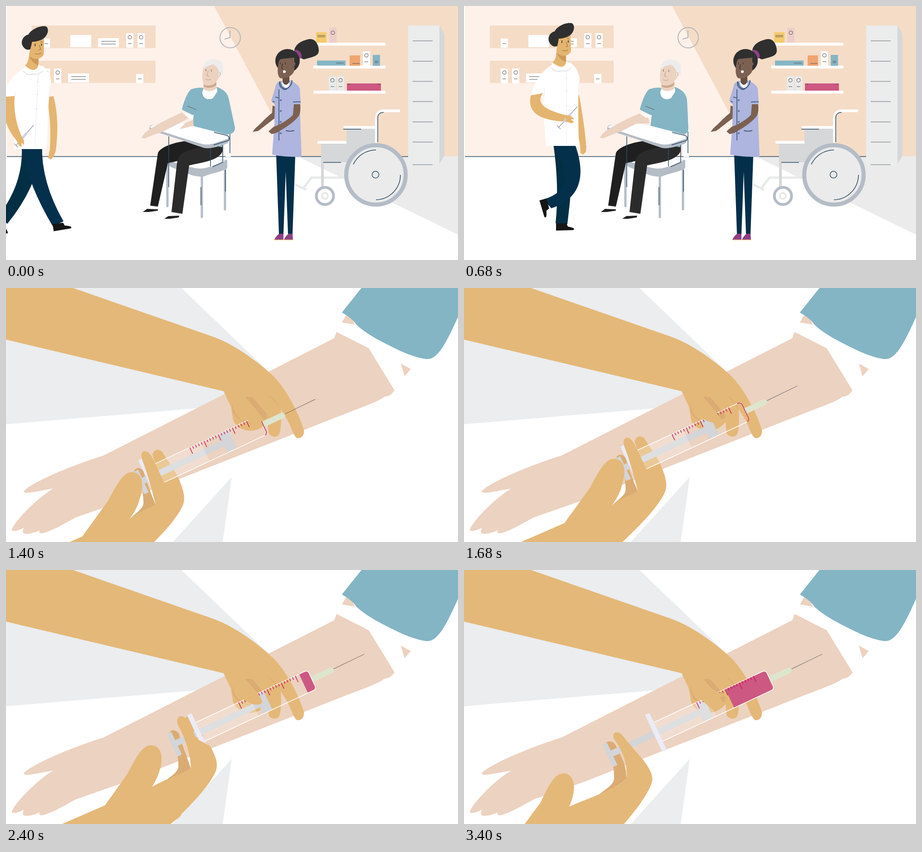
Write an HTML page that moves like this. It is 997 by 561 pixels and loops after 3.44 s.

```html
<!DOCTYPE html>
<html lang="en">
<head>
<meta charset="utf-8">
<title>Blood test</title>
<style>
html, body { margin: 0; width: 100%; height: 100%; overflow: hidden; background: #fff; }
svg { display: block; width: 100%; height: 100%; }
.line { fill: none; stroke: #2c4c63; stroke-width: 1.5; }
.thin { fill: none; stroke: #555; stroke-width: 1; }
.steel { fill: none; stroke: #b4bcc6; stroke-width: 5; stroke-linecap: round; }
</style>
</head>
<body>
<svg viewBox="0 0 997 561" preserveAspectRatio="none">
<g id="room">
  <path d="M2 0H997V332H2Z" fill="#fef1ea"/>
  <path d="M459 0H997V332H636Z" fill="#f5dcc7"/>
  <path d="M643 332H997V505Z" fill="#ebebeb"/>
  <path d="M2 332.500H887" class="line"/>
  <path d="M57 43H330V93H57ZM57 121H330V170H57Z" fill="#f5dcc7"/>
  <g id="boxes"></g>
  <g fill="none" stroke="#b3b5b8" stroke-width="2"><circle cx="494.500" cy="70" r="22.500"/><path d="M494 54V70L482 73"/></g>
  <path d="M887 43H956V354H887Z" fill="#ebecec"/>
  <path d="M956 43L967 62V331L956 349Z" fill="#d6d7d8"/>
  <path id="drawers" fill="none" stroke="#8f979c" stroke-width="1.500"/>

  <g id="wheelchair" fill="none">
    <path d="M638 394L662 406M656 402L674 379H748" stroke="#e8e9ea" stroke-width="5"/>
    <path d="M698 300V400" stroke="#d6d7d8" stroke-width="6"/>
    <path d="M751 270H815V345H695V304H751Z" fill="#d6d7d8"/>
    <path d="M869 231.500H835Q817 231.500 817 250V302M745 268H817M687 301H751" stroke="#fff" stroke-width="6"/>
    <path d="M833 235Q820 235 820 248V301M744 272H783M700 345.500H739" class="line"/>
    <circle cx="816" cy="373" r="65.500" fill="#ebebeb" stroke="#b4bcc6" stroke-width="9"/>
    <path d="M766 350A55 55 0 0 1 816 318M870 373A55 55 0 0 1 816 428" class="line"/>
    <circle cx="815" cy="372.500" r="7.500" class="line"/>
    <circle cx="703.500" cy="419.500" r="19" fill="#fff" stroke="#b4bcc6" stroke-width="6"/>
    <circle cx="703.500" cy="419.500" r="6.500" stroke="#e8e8e8" stroke-width="4"/>
  </g>

  <g id="patient">
    <path d="M484 250H496V333H484Z" fill="#fff"/>
    <path d="M356 345V442M432 375V466M483 360V449" class="steel"/>
    <path d="M358 346L364 338L488 340V357C486 364 450 370 438 376C430 378 415 376 405 372L362 355Z" fill="#b4bcc6"/>
    <path d="M385 335L484 341C470 350 440 360 425 359C410 358 385 350 370 345Z" fill="#fff"/>
    <path d="M450 295L479 298V317L450 314Z" fill="#84b5c4"/>
    <path d="M410 297C380 298 340 310 335 325L318 441L335 443L357 347L385 341L440 315Z" fill="#1f1f1f"/>
    <path d="M478 312C450 305 420 314 400 320C384 325 379 335 377 348L365 455L389 459L404 352C430 346 470 342 478 320Z" fill="#2b2b2b"/>
    <path d="M302 455L311 448L335 449V452L315 455ZM349 470L358 464L382 463L381 467L362 470Z" fill="#222"/>
    <path d="M359 288V400M430 400V440M484 362V410M478 303V345L456 355M451 315V354M494 277V325" class="line"/>
    <path id="shirt" fill="#84b5c4"/>
    <path d="M392 236L414 241L411 250L396 247Z" fill="#fff"/>
    <path d="M400 221L420 229" class="thin" stroke-width="2"/>
    <path d="M316 271Q315 262 328 262L386 258L488 284Q495 288 492 296L489 303C470 310 455 315 440 314C428 312 380 292 316 274Z" fill="#b4bcc6"/>
    <path d="M317 268Q320 262 333 262L386 258L486 284Q493 287 490 293C470 299 455 307 440 306C428 305 370 285 317 268Z" fill="#fff"/>
    <path d="M459 279L484 285Q496 288 491 297L458 307" class="line"/>
    <path id="restHand" fill="#ecd2c0"/>
    <path id="forearm" fill="#ecd2c0"/>
    <path d="M433 190C433 206 448 209 457 203L466 189L465 180L436 181Z" fill="#fff"/>
    <path d="M436 165L464 158V182C456 190 442 189 435 183Z" fill="#ecd2c0"/>
    <path d="M436 174C446 178 458 175 464 168V174C456 182 444 182 436 178Z" fill="#cda88d"/>
    <g id="patientHead">
      <path d="M436 130L470 128L472 155C466 168 450 176 440 174C430 171 433 150 436 130Z" fill="#ecd2c0"/>
      <path d="M434 136C436 122 450 116 462 118C478 120 481 130 479 142C481 152 473 158 469 153C472 140 464 133 457 129L443 133Q438 140 434 136Z" fill="#ececec"/>
      <path d="M446 143L443 154L448 155M440 162Q446 165 452 162M470 146Q476 148 471 154" fill="none" stroke="#bd9880"/>
      <path d="M441 139V144M453 140V145" class="thin" stroke-width="2"/>
    </g>
  </g>

  <g id="carer">
    <path d="M596 330L638 332L632 503H622L617 366L612 503H602Z" fill="#042f4a"/>
    <path d="M602 503H612V516H592Q595 509 602 503ZM623 503H632L633 516H613Q616 509 623 503Z" fill="#8d4085"/>
    <path d="M592 516.500H612M613 516.500H633" stroke="#e4b570" stroke-width="1.500"/>
    <path d="M588 220L594 222L593 248C580 257 565 270 556 276L544 278L550 270C562 260 575 245 587 236Z" fill="#7c6152"/>
    <path d="M604 166C598 168 595 173 594 180L585 209L593 218L592 260L587 328C600 332 635 334 652 333L650 280L648 218L650 215L648 182C646 175 636 170 630 164Z" fill="#aeb5de"/>
    <path d="M610 155H625V174Q617 188 609 172Z" fill="#fff"/>
    <path d="M610 155H625V168Q617 180 610 168Z" fill="#694f42"/>
    <path d="M604 167C608 190 628 187 631 164M604 167Q601 176 609 182Q616 188 622 181Q631 175 631 164M588 211L593 212M633 212L650 211.500M602 184V297M617 275Q626 278 636 275M594 201L601 203" class="line"/>
    <path d="M635 217H649C650 230 649 240 644 245C630 262 605 275 597 280L586 283L579 277L590 267C605 262 625 250 633 240Z" fill="#7c6152"/>
    <g id="buttons" fill="#59689a"></g>
    <path d="M636 97C639 84 652 76 670 73C682 72 689 84 690 98C690 107 684 110 675 113L657 118C645 113 636 107 636 97Z" fill="#2f2f2f"/>
    <path d="M636 97C648 95 655 108 651 115L640 120Z" fill="#8d4085"/>
    <ellipse cx="621" cy="121" rx="27" ry="26" fill="#2f2f2f"/>
    <path d="M600 132C601 124 602 120 606 117L636 114V142C634 153 616 163 604 159C598 152 599 140 600 132Z" fill="#7c6152"/>
    <circle cx="635" cy="128" r="3.500" fill="#7c6152"/>
    <path d="M605 125V129M616 125V129M610 128L608 138L611 139" fill="none" stroke="#3c2c25" stroke-width="1.300"/>
    <circle cx="614" cy="145" r="3" fill="#fff"/>
  </g>

  <g id="visitor">
    <path id="farArm" fill="#e4b570"/>
    <path id="legB" fill="#022f43"/><path id="shoeB" fill="#161616"/>
    <path id="legA" fill="#04304c"/><path id="shoeA" fill="#161616"/>
    <g id="torso">
      <path id="tunic" fill="#fff"/>
      <path d="M6 -180V-5M-44 -106L-42 -128M32 -110V-140" fill="none" stroke="#e8e8ec"/>
      <g fill="#e2e2e8"><circle cx="6" cy="-150" r="1.500"/><circle cx="6" cy="-122" r="1.500"/><circle cx="6" cy="-90" r="1.500"/></g>
      <g id="visitorHead">
        <path d="M-16 -215L5 -203V-182Q-6 -168 -24 -186Q-16 -192 -16 -215Z" fill="#e4b570"/>
        <path d="M-16 -206L5 -200V-186Q-8 -190 -16 -206Z" fill="#cb9a56"/>
        <path d="M-14 -238L15 -245L16 -211C14 -202 2 -198 -6 -201L-16 -206Z" fill="#e4b570"/>
        <path d="M-32 -230C-37 -240 -30 -252 -20 -254C-15 -265 5 -275 18 -272C27 -266 22 -250 12 -244C5 -240 -5 -238 -11 -238L-14 -222C-20 -218 -28 -222 -32 -230Z" fill="#2f2f2f"/>
        <path d="M-4 -234V-228M10 -234V-229" fill="none" stroke="#333" stroke-width="1.600"/>
        <path d="M5 -231L9 -221L4 -220M-3 -212Q4 -209 10 -213M-8 -238L-1 -239M7 -239L12 -237" fill="none" stroke="#8d672f"/>
      </g>
      <path d="M-26 -187C-20 -173 -4 -172 2 -177L6 -188Q16 -182 16 -174Q8 -164 -4 -166Q-20 -162 -27 -173Z" fill="#fff"/>
      <path d="M-27 -174Q-20 -162 -4 -167Q8 -164 16 -174" fill="none" stroke="#e4e4e8" stroke-width="2"/>
    </g>
    <path id="nearArm" fill="#e4b570"/>
    <path id="needleLine" fill="none" stroke="#8f93a6" stroke-width="1.200"/>
    <path id="needleBody" fill="none" stroke="#cfd0e2" stroke-width="5"/>
    <path id="nearHand" fill="#e4b570"/>
  </g>
</g>

<g id="closeup">
  <path d="M0 0H997V561H0Z" fill="#fff"/>
  <path d="M0 301L430 265L590 195L387 0H0ZM498 417L478 561H368Z" fill="#ebedef"/>
  <path d="M39 450C45 437 120 400 215 370L724 111L729 97L800 133L857 226C850 236 845 239 835 240C820 252 780 265 750 277L262 469L153 507C130 520 95 540 78 542C72 541 73 537 75 535C65 540 45 546 38 541C36 537 38 533 40 529C30 535 18 538 13 536C10 526 60 470 104 443C85 446 50 454 42 452ZM741 76L750 60L765 69L769 81ZM871 167L893 179L879 195Z" fill="#ecd2c0"/>
  <path d="M784 0L741 54C760 66 765 70 772 80C795 103 835 122 872 140C895 150 918 157 930 157C955 157 975 112 997 64V0Z" fill="#84b5c4"/>
  <path d="M0 0H148L455 107C505 124 562 168 592 197C625 232 648 285 657 313C659 328 648 334 641 331C634 325 628 305 620 290L606 268C608 295 606 315 603 322C598 331 586 330 580 322C578 315 578 305 577 296C565 312 545 317 535 315C515 313 500 300 500 284L496 262L480 228L0 114Z" fill="#e4b878"/>
  <g fill="#daac74">
    <path d="M527 240L543 241L575 278L576 286L569 291L552 269Z"/>
    <path d="M500 256C495 280 515 299 550 300C515 295 502 280 500 256ZM576 236Q594 243 603 264Q592 246 576 236Z"/>
  </g>
  <path id="darkFinger" fill="#daac74"/>
  <path id="backFinger" fill="#e4b878"/>
  <g id="syringe">
    <path d="M52 -1L128 -2" stroke="#666" stroke-width="1"/>
    <path d="M1 -7H46Q53 -6 53 0Q53 6 46 6H1Z" fill="#dee5cd"/>
    <path id="rod" fill="#d3d5d8"/>
    <path d="M-272 -23H-141V23H-272Z" fill="#fff" opacity=".23"/>
    <path id="blood" fill="#cd5881"/>
    <path d="M-272 -23H-8Q0 -23 0 -15V15Q0 23 -8 23H-272" fill="none" stroke="#fff" stroke-width="1.500"/>
    <path d="M-9 -23Q0 -23 0 -15V15Q0 22 -6 23" fill="none" stroke="#c4265c" stroke-width="1.500" id="rim"/>
    <path id="ticks" fill="none" stroke="#c9185a" stroke-width="1.500"/>
    <rect x="-283" y="-46" width="11" height="90" rx="3" fill="#ecebf6"/>
  </g>
  <path id="hand" fill="#e4b878"/>
  <path d="M500 250L505 268L525 287C540 297 555 300 563 295C568 290 560 278 552 269L527 240Z" fill="#e4b878"/>
  <g id="grip"><path d="M520 284L553 312Q568 308 577 294L572 275L545 262Z" fill="#e4b878"/><path d="M565 280L576 279V290L570 292Z" fill="#daac74"/></g>
</g>
</svg>
<script>
const LOOP = 3440, STEP = 40, CUT = 1240;
const $ = id => document.getElementById(id);
const set = (id, d) => $(id).setAttribute('d', d);
const clamp = v => Math.min(1, Math.max(0, v));
const lerp = (a, b, k) => a + (b - a) * k;
const smooth = k => k * k * (3 - 2 * k);
const NUM = /-?\d+(\.\d+)?/g;

// Blend two paths that share one command structure
function mix(a, b, k) {
  const to = b.match(NUM);
  let i = 0;
  return a.replace(NUM, v => lerp(+v, +to[i++], k).toFixed(2));
}

// Rows are [time, ...values]
function key(t, rows) {
  let i = 0;
  while (i < rows.length - 2 && t > rows[i + 1][0]) i++;
  const [a, b] = [rows[i], rows[i + 1]];
  const k = clamp((t - a[0]) / (b[0] - a[0]));
  return a.slice(1).map((v, n) => lerp(v, b[n + 1], k));
}

// Tapered limb bent through its middle joint
function limb(p, [w0, w1, w2]) {
  const [x0, y0, x1, y1, x2, y2] = p;
  const normal = (dx, dy) => { const l = Math.hypot(dx, dy) || 1; return [-dy / l, dx / l]; };
  const n0 = normal(x1 - x0, y1 - y0), n1 = normal(x2 - x0, y2 - y0), n2 = normal(x2 - x1, y2 - y1);
  const side = s => [
    [x0 + n0[0] * w0 * s, y0 + n0[1] * w0 * s],
    [x1 + n1[0] * w1 * s, y1 + n1[1] * w1 * s],
    [x2 + n2[0] * w2 * s, y2 + n2[1] * w2 * s]];
  const bend = ([a, b, c]) => [0, 1].map(i => 2 * b[i] - (a[i] + c[i]) / 2);
  const l = side(.5), r = side(-.5);
  return `M${l[0]}Q${bend(l)} ${l[2]}L${r[2]}Q${bend(r)} ${r[0]}Z`;
}

function box(x, y, w, h, fill, marks = '') {
  return `<rect x="${x}" y="${y}" width="${w}" height="${h}" fill="${fill}"/><path d="${marks}" class="thin"/>`;
}
const dash = (x, y, w) => `M${x} ${y}h${w}`;
const ring = (x, y) => `M${x - 4} ${y}a4 4 0 1 0 8 0a4 4 0 1 0 -8 0`;
const bottle = (x, y, fill = '#fff') => box(x, y, 16, 32, fill, ring(x + 8, y + 9) + dash(x + 4, y + 23, 8));
const carton = (x, y) => box(x, y, 46, 20, '#fff', dash(x + 7, y + 7, 32) + dash(x + 7, y + 13, 32));
const small = (x, y) => box(x, y, 16, 20, '#fff', dash(x + 4, y + 11, 8));

$('boxes').innerHTML =
  small(81, 72) + box(142, 64, 46, 27, '#fff') + carton(203, 71) + bottle(265, 60) + bottle(290, 60) +
  bottle(81, 138) + bottle(106, 138) + carton(137, 149) + small(287, 150) +
  [81, 131.5, 187].map(y => box(678, y, 159, 6.5, '#fff')).join('') +
  box(684, 58, 23, 23, '#f4cb6c', dash(687, 65, 17) + dash(687, 68, 17)) +
  box(713, 48, 16, 33, '#edcdc9', ring(721, 59)) +
  box(686, 120.5, 63, 11, '#84b5c4', dash(728, 126, 17)) +
  box(758, 109, 23, 23, '#efa572', dash(764, 127, 16)) + bottle(787, 100) +
  box(809, 108, 16, 24, '#84b5c4', dash(813, 122, 8) + dash(813, 125, 8)) +
  bottle(712, 155, '#e9eaea') + bottle(730, 155, '#e9eaea') +
  box(752, 171, 75, 16, '#cd5881', dash(753, 173, 7) + dash(819, 173, 7));
set('drawers', [77, 122, 166.5, 211, 256, 300.5, 350.5].map(y => dash(897, y, 44)).join(''));
$('buttons').innerHTML = [208, 232, 256, 281].map(y => `<circle cx="606" cy="${y}" r="2"/>`).join('');

let marks = '';
for (let i = 0; i <= 20; i++) marks += `M${-30 - i * 6.9} -23v${i % 5 ? 6 : 15}`;
set('ticks', marks);

// Walk cycle: contact, passing, contact, passing, standing
const HIP = [[0, 57, 317], [225, 110, 311], [450, 164, 317], [680, 220, 310], [960, 213, 317]];
const LEG_A = [[0, 75, 395, 115, 481, -8], [225, 118, 395, 114, 481, 0], [450, 150, 400, 108, 474, 40], [680, 237, 390, 184, 437, 75], [960, 199, 400, 197, 483, 0]];
const LEG_B = [[0, 39, 395, -8, 474, 45], [225, 128, 388, 72, 437, 75], [450, 178, 395, 215, 480, -10], [680, 221, 395, 215, 481, 0], [960, 222, 400, 217, 480, 0]];
const STANCE = [[0, 0], [680, 0], [960, 13]];
const LEAN = [[0, 2.8, 0, 0], [680, 0, 0, 0], [960, 6.6, 13, 4]];
const NEAR = [[0, -52, -117, -47, -67, -27, -22], [680, -59, -115, -52, -80, 8, -61], [960, -31, -112, -29, -80, 46, -68]];
const FAR = [[0, 40, -117, 48, -60, 46, 4], [680, 26, -112, 36, -50, 43, 0], [960, 37, -114, 56, -66, 90, -24]];
const FAR_TIP = [[0, -4, 18], [680, 0, 18], [960, 6, 15]];
const TOOL = [[0, -35, -9, 4, -54], [680, -11, -42, 30, -88], [960, 27, -50, 80, -84]];

function shoe(id, x, y, turn) {
  set(id, 'M-12 -1H11L14 6C22 8 28 9 28 12L26 14L-12 15Z');
  $(id).setAttribute('transform', `translate(${x} ${y}) rotate(${turn})`);
}

function drawVisitor(t) {
  const [hx, hy] = key(t, HIP), [s] = key(t, STANCE), [lean, drop, tilt] = key(t, LEAN);
  const at = p => p.map((v, i) => v + (i % 2 ? hy : hx));
  const leg = (n, rows, off) => {
    const [kx, ky, ax, ay, turn] = key(t, rows);
    set('leg' + n, limb([hx + off, hy - 6, kx, ky, ax, ay], [46 - s, 32, 26]));
    shoe('shoe' + n, ax, ay, turn);
  };
  leg('A', LEG_A, -s);
  leg('B', LEG_B, s);
  $('torso').setAttribute('transform', `translate(${hx} ${hy}) skewX(${-lean})`);
  $('visitorHead').setAttribute('transform', `translate(0 ${drop}) rotate(${tilt} 0 -190)`);
  set('tunic', `M-25 -180C-38 -174 ${-60 + s} -155 ${-71 + s} -118L${-44 + s / 2} -106L-46 -92L-39 -1L33 -1L32 -70L32 -108L35 -150C32 -170 22 -180 14 -185Z`);
  const far = at(key(t, FAR)), [fx, fy] = key(t, FAR_TIP), [ex, ey] = far.slice(4);
  set('farArm', limb(far, [16, 16, 13]) + `M${ex - 7} ${ey - 2}L${ex - 6 + fx} ${ey + fy - 3}L${ex + fx} ${ey + fy}L${ex + 6 + fx} ${ey + fy - 6}L${ex + 7} ${ey - 2}Z`);
  const near = at(key(t, NEAR)), [nx, ny] = near.slice(4);
  set('nearArm', limb(near, [28, 24, 14]));
  const turn = Math.atan2(ny - near[3], nx - near[2]) * 180 / Math.PI;
  set('nearHand', 'M-4 -7L6 -8L15 -4L8 -1L16 2L12 7L-3 7Z');
  $('nearHand').setAttribute('transform', `translate(${nx} ${ny}) rotate(${turn})`);
  const [x0, y0, x1, y1] = at(key(t, TOOL));
  const on = k => `${lerp(x0, x1, k)} ${lerp(y0, y1, k)}`;
  set('needleLine', `M${on(0)}L${on(1)}M${x0 - 4} ${y0 - 4}l8 8`);
  set('needleBody', `M${on(.25)}L${on(.62)}`);
}

function drawPatient(t) {
  const [ex] = key(t, [[0, 505], [680, 495], [1040, 491]]);
  const k = smooth(clamp((t - 500) / 460));
  set('shirt', `M408 184C424 179 434 180 440 182L466 179C481 185 490 193 492 208L${ex} 268C${ex + 1} 280 ${ex - 8} 283 486 284L470 281L411 267L414 242L388 229C391 215 399 192 408 184Z`);
  set('forearm', mix(
    'M388 235L403 248L345 278C325 284 312 290 306 293L298 291L304 283C312 274 330 262 388 235Z',
    'M386 241L401 249L348 276C330 283 318 287 311 291L302 291L307 282C318 274 335 262 386 241Z', k));
  set('restHand', mix(
    'M383 272L396 258L413 251L414 265L400 268Z',
    'M364 238L378 231L395 236L400 249L375 244Z', k));
  $('patientHead').setAttribute('transform', `translate(${-2 * k} ${2 * k}) rotate(${-3 * k} 452 165)`);
}

// Poses of the drawing hand: pressed in, pulling, fully drawn
const HAND = [
  'M111 561L276 489L333 410C355 368 368 347 385 347C410 347 413 375 403 405C398 425 388 440 380 451C398 435 415 430 438 419C432 395 420 350 409 322C402 303 412 296 421 303C432 312 440 335 457 370L487 357C502 392 503 405 498 420C480 460 430 505 405 530L402 537L368 561Z',
  'M137 561L158 552L200 492C222 450 232 429 254 429C278 432 279 465 270 488C267 495 264 502 262 508C290 496 340 480 376 459C384 435 372 395 350 368C342 350 352 343 364 348C374 355 378 370 382 376L412 422C428 444 430 455 426 470C412 500 390 525 370 547L365 553L358 561Z',
  'M134 561L150 539L168 515C192 466 200 450 222 449C246 453 246 485 237 510C235 515 233 519 232 523C262 508 325 490 358 461C362 430 350 400 331 373C325 360 335 355 345 361C352 367 358 377 364 383L398 423C414 445 418 458 414 470C408 490 385 522 372 538L363 549L353 561Z'];
const DARK = [
  'M389 349C391 336 404 334 412 346C414 360 426 390 438 419C430 425 400 438 380 451C400 432 410 428 411 415C411 400 408 380 404 365Z',
  'M327 378C330 368 343 368 350 378C356 400 370 430 376 459C355 472 330 485 308 492C330 475 345 470 348 455C349 440 346 425 340 405Z',
  'M311 386C314 376 327 376 334 386C345 410 360 430 358 461C340 478 310 490 292 500C315 482 330 475 331 460C331 445 330 430 325 410Z'];
const BACK = [
  'M431 308C434 296 446 294 453 303C462 318 475 335 487 357L457 370C447 350 435 325 431 308Z',
  'M350 360C354 351 360 349 366 353C374 360 378 370 382 378L372 390C362 380 354 370 350 360Z',
  'M333 374C337 364 343 362 349 366C357 374 361 384 364 390L354 402C345 392 337 382 333 374Z'];

function drawCloseup(t) {
  const go = smooth(clamp((t - 1360) / 640));
  const dx = lerp(-109, 0, go), dy = lerp(60.5, 0, go);
  const k = clamp((t - 2200) / 1200), pull = 1 - (1 - k) ** 2.9;
  const pose = list => pull < .84 ? mix(list[0], list[1], pull / .84) : mix(list[1], list[2], (pull - .84) / .16);
  for (const [id, poses] of [['hand', HAND], ['darkFinger', DARK], ['backFinger', BACK]]) {
    set(id, pose(poses));
    $(id).setAttribute('transform', `translate(${dx} ${dy})`);
  }
  $('syringe').setAttribute('transform', `translate(${675 + dx} ${242 + dy}) rotate(-25.100)`);
  const rest = -93 * pull, head = -74 * Math.min(1, pull * 1.06);
  const a = -303 + rest, b = -98 + head;
  set('rod', `M${a} -27h11v20H${b}V-22h23V22h-23V7H${a + 11}V28h-11Z`);
  const fill = 98 * (1 - (1 - k) ** 1.3);
  set('blood', fill > 0 ? `M${-fill} -23H${-Math.min(8, fill)}Q0 -23 0 -15V15Q0 23 ${-Math.min(8, fill)} 23H${-fill}Z` : 'M0 0');
  $('rim').style.display = fill > 8 ? 'none' : '';
  $('grip').style.display = pull > .5 ? '' : 'none';
}

const start = performance.now();
function draw(now) {
  const t = Math.floor((Math.max(0, now - start) % LOOP) / STEP) * STEP;
  const wide = t < CUT;
  $('room').style.display = wide ? '' : 'none';
  $('closeup').style.display = wide ? 'none' : '';
  if (wide) { drawVisitor(t); drawPatient(t); } else drawCloseup(t);
  requestAnimationFrame(draw);
}
draw(start);
</script>
</body>
</html>
```
